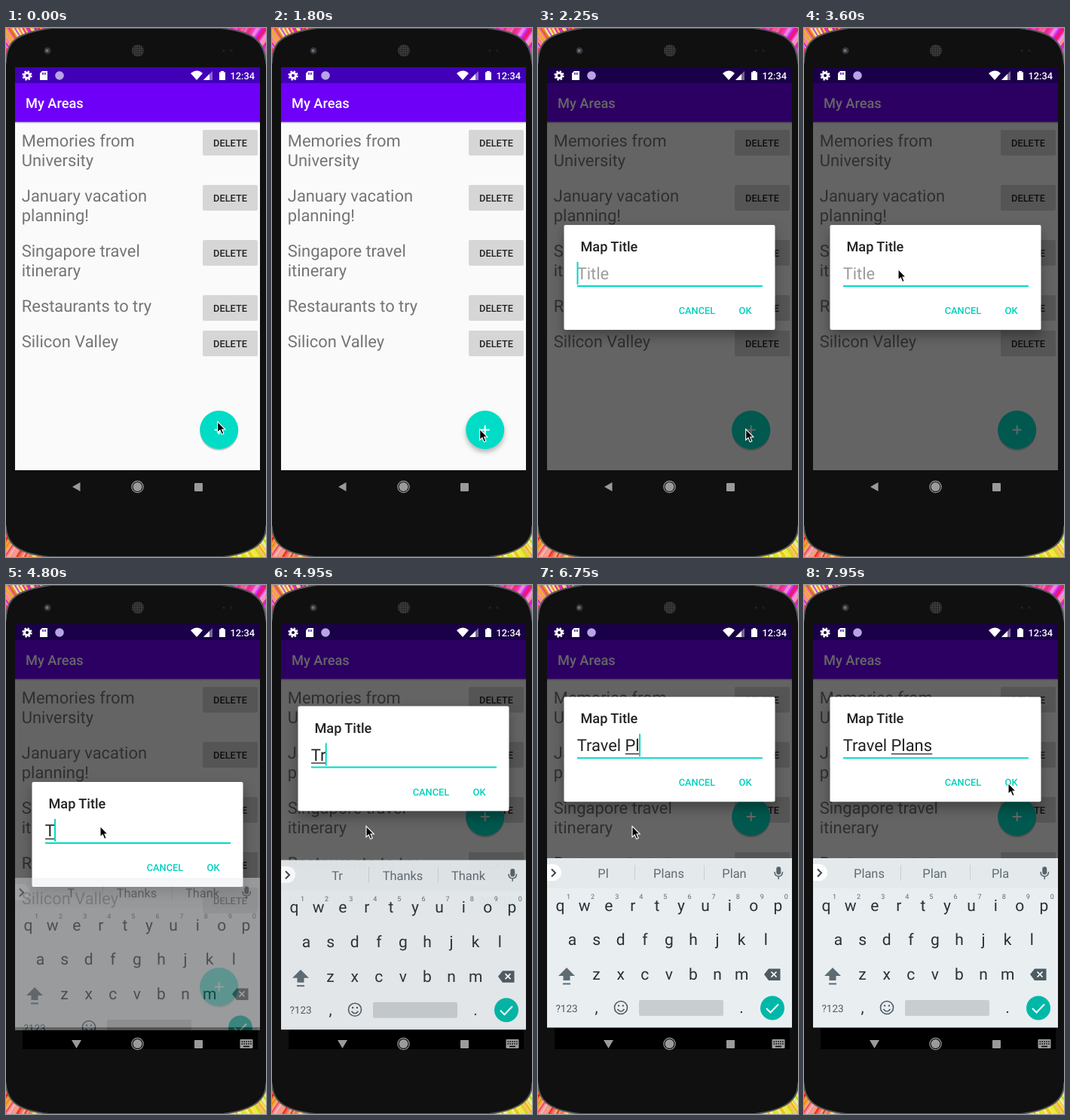
Recreate the animation shown at these times as an HTML page. Size 345 by 701 pixels, loop 8 s.

```html
<!DOCTYPE html>
<html lang="en">
<head>
<meta charset="utf-8">
<title>New map dialog</title>
<style>
  html, body { margin: 0; width: 100%; height: 100%; overflow: hidden; background: #111; }
  svg { display: block; width: 345px; height: 701px; }
  text { font-family: Roboto, "Noto Sans", sans-serif; white-space: pre; text-rendering: geometricPrecision; }
  .medium { font-weight: 500; }
  .mid { text-anchor: middle; }
  #dialog { filter: drop-shadow(0 8px 8px rgba(0, 0, 0, .32)); }
</style>
</head>
<body>
<svg viewBox="0 0 345 701">
  <defs>
    <linearGradient id="barShadow" x2="0" y2="1">
      <stop stop-color="#000" stop-opacity=".3"/>
      <stop offset="1" stop-color="#000" stop-opacity="0"/>
    </linearGradient>
    <clipPath id="screenClip"><rect x="12" y="52" width="325" height="534"/></clipPath>
    <clipPath id="keysClip"><rect x="12" y="52" width="325" height="538"/></clipPath>
    <pattern id="mesh" width="3" height="3" patternUnits="userSpaceOnUse">
      <rect width="3" height="3" fill="#3c3c3c"/><circle cx="1.5" cy="1.5" r=".9" fill="#191919"/>
    </pattern>
  </defs>

  <g id="wallpaper" stroke-width="2.5"/>
  <path d="M0 41C2 18 13 7 60 0H285C332 5 343 20 345 45V664C343 688 318 697 288 701H57C22 697 3 688 0 664Z"
    fill="#101010" stroke="#55585a" stroke-width="2"/>
  <path d="M0 49C4 22 20 12 64 5H281C325 11 341 24 345 50V658C340 684 316 692 284 696H61C26 692 5 684 0 658Z" fill="#101010"/>
  <circle cx="55" cy="30" r="4.5" fill="#33363b"/><circle cx="54.5" cy="30" r="2" fill="#70757e"/>
  <circle cx="175" cy="30" r="8" fill="url(#mesh)"/>
  <circle cx="289" cy="30" r="1.5" fill="#252525"/><circle cx="299" cy="30" r="2" fill="#1c1c1c"/>

  <g clip-path="url(#screenClip)">
    <rect x="12" y="52" width="325" height="535" fill="#fafafa"/>
    <g id="list"/>
    <rect x="12" y="124" width="325" height="3" fill="url(#barShadow)"/>
    <rect x="12" y="52" width="325" height="22" fill="#4100b8"/>
    <rect x="12" y="73" width="325" height="51.500" fill="#6e00f8"/>
    <text x="26" y="106" class="medium" font-size="18.2" fill="#fff">My Areas</text>
    <g id="fab">
      <circle id="fabDisc" r="25.5" fill="#00dcc5"/>
      <circle id="ripple" r="18" fill="#fff"/>
      <path d="M-6 0H6M0-6V6" stroke="#fff" stroke-width="2"/>
    </g>
    <rect id="dim" x="12" y="52" width="325" height="535"/>
  </g>

  <g fill="#fff">
    <circle cx="28" cy="63" r="3.5" fill="none" stroke="#fff" stroke-width="3"/>
    <circle cx="28" cy="63" r="5.6" fill="none" stroke="#fff" stroke-width="2" stroke-dasharray="2.4 2"/>
    <path d="M48 57H55V69H45V60Z"/>
    <path d="M48.500 59V62M50.500 59V62M52.500 59V62" stroke="#4100b8"/>
    <circle cx="71" cy="63" r="5.8" fill="#b7a4e6"/>
    <path d="M245 60Q253 53 261 60L253 69Z"/>
    <path d="M274 57V69H262Z" opacity=".4"/><path d="M270 61V69H262Z"/>
    <path d="M285 57H289V58.500H291V69H283V58.500H285Z"/>
    <text x="297.500" y="67.500" class="medium" font-size="12.8">12:34</text>
  </g>

  <g id="dialog">
    <rect x="34.500" width="280" height="139" rx="2" fill="#fff"/>
    <text x="56.500" y="35" class="medium" font-size="18.100" fill="#212121">Map Title</text>
    <text id="hint" x="51.700" y="72" font-size="21.900" fill="#9c9c9c">Title</text>
    <text id="typed" x="51.700" y="72" font-size="21.900" fill="#212121"></text>
    <path id="composing" stroke="#212121" stroke-width="1.300"/>
    <rect x="52" y="80" width="246" height="2" fill="#00d9c5"/>
    <rect id="caret" y="49" width="2" height="30" fill="#00d9c5"/>
    <g class="medium mid" font-size="12.800" fill="#00d0bc">
      <text x="211" y="118">CANCEL</text><text x="275" y="118">OK</text>
    </g>
  </g>

  <rect id="navBack" x="22" y="587" width="312" height="28" fill="#000"/>
  <g clip-path="url(#keysClip)">
    <g id="keyboard">
      <rect x="12" y="362" width="325" height="224.500" fill="#e9eef1"/>
      <rect x="12" y="362" width="325" height="40" fill="#e4e9ec"/>
      <path d="M12 370H20A11 11 0 0 1 20 392H12Z" fill="#fff"/>
      <path d="M18 376.500L23 381.500L18 386.500" fill="none" stroke="#37474f" stroke-width="2"/>
      <path d="M128.500 371V392M220.500 371V392" stroke="#c9cfd2"/>
      <g id="suggestions" class="mid" font-size="16.400" fill="#5e6b71"/>
      <g fill="none" stroke="#56646b" stroke-width="1.500">
        <rect x="317" y="374" width="4.500" height="9" rx="2.200" fill="#56646b"/>
        <path d="M314 380Q314 386 319.200 386T324.500 380M319.200 386V390"/>
      </g>
      <g id="keys" class="mid" fill="#263238"/>
      <path d="M38 507L49 518H42.500V524H33.500V518H27Z" fill="#5d6b73"/>
      <path d="M33 528.500H43" stroke="#5d6b73" stroke-width="2"/>
      <path d="M300 516L306 508.500H321.500V524H306Z" fill="#4d5b63"/>
      <path d="M309.500 512.500L316.500 519.500M316.500 512.500L309.500 519.500" stroke="#fff" stroke-width="1.700"/>
      <g fill="none" stroke="#4d5b63" stroke-width="1.600">
        <circle cx="110" cy="560" r="8.500"/><path d="M105.500 562Q110 568 114.500 562"/>
        <path d="M106 557.500H108.200M111.800 557.500H114" stroke-width="2.200"/>
      </g>
      <rect x="134" y="550" width="112" height="21" rx="2" fill="#c8cdd0"/>
      <circle cx="311" cy="560.500" r="16" fill="#00b8a8"/>
      <path d="M303 561L308.500 566.500L319 555.500" fill="none" stroke="#fff" stroke-width="2"/>
    </g>
  </g>

  <g fill="#9a9a9a">
    <path id="back"/>
    <circle cx="174.500" cy="608" r="6"/>
    <circle cx="174.500" cy="608" r="7.700" fill="none" stroke="#9a9a9a" stroke-width="1.200"/>
    <rect x="250" y="603" width="11" height="11" rx="1"/>
    <g id="imeIcon">
      <rect x="310.500" y="602" width="17" height="12" rx="1"/>
      <path d="M312.500 605H326M312.500 608H326" stroke="#000" stroke-width="1.500" stroke-dasharray="1.600 1.300"/>
      <path d="M315 611.500H323" stroke="#000" stroke-width="1.500"/>
    </g>
  </g>
  <path id="pointer" d="M0 0V14.500L3.300 11.500L5.600 17L8.200 16L5.900 10.500H10.200Z" fill="#000" stroke="#fff" stroke-width="1.100"/>
</svg>

<script>
const LOOP = 8000, STEP = 150;
const $ = id => document.getElementById(id);
const set = (id, attrs) => { for (const k in attrs) $(id).setAttribute(k, attrs[k]); };
const show = (id, on) => set(id, { visibility: on ? 'visible' : 'hidden' });

function add(parent, tag, attrs, text = '') {
  const el = document.createElementNS('http://www.w3.org/2000/svg', tag);
  for (const k in attrs) el.setAttribute(k, attrs[k]);
  el.textContent = text;
  return $(parent).appendChild(el);
}

let seed = 7;
const random = () => (seed = seed * 16807 % 2147483647) / 2147483647;

// Each corner shows paint streaks around its own hue: x, y, hue, spread
const corners = [[0, 0, 350, 170], [285, 0, 318, 60], [0, 655, 18, 60], [285, 655, 52, 45]];
for (const [x, y, hue, spread] of corners) {
  add('wallpaper', 'rect', { x, y, width: 60, height: 46, fill: `hsl(${hue} 85% 60%)` });
  for (let i = 0; i < 26; i++) {
    const sx = x + i * 2.4, lean = (sx - 172) * .1 * (y ? 1 : -1);
    add('wallpaper', 'path', {
      d: `M${sx - lean} ${y}L${sx + lean} ${y + 46}`,
      stroke: `hsl(${hue + (random() - .5) * spread} 85% ${45 + random() * 35}%)`
    });
  }
}

const rows = [
  [135, 'Memories from', 'University'],
  [208, 'January vacation', 'planning!'],
  [281, 'Singapore travel', 'itinerary'],
  [354, 'Restaurants to try'],
  [401, 'Silicon Valley']
];
for (const [y, ...lines] of rows) {
  lines.forEach((line, i) => add('list', 'text',
    { x: 20.8, y: y + 22 + i * 25.7, 'font-size': 21.9, fill: '#757575' }, line));
  add('list', 'rect', { x: 261, y, width: 73, height: 34, rx: 2, fill: '#d6d6d6' });
  add('list', 'text', { x: 297.5, y: y + 21.5, class: 'medium mid', 'font-size': 12.8, fill: '#212121' }, 'DELETE');
}

const key = (x, y, label, size = 21) => add('keys', 'text', { x, y, 'font-size': size }, label);
[['qwertyuiop', 29.5, 431.5], ['asdfghjkl', 45.5, 477], ['zxcvbnm', 77.5, 523]].forEach(([letters, x, y], row) =>
  [...letters].forEach((letter, i) => {
    key(x + i * 32.1, y, letter);
    if (!row) key(x + 11 + i * 32.1, 416, (i + 1) % 10, 9).setAttribute('fill', '#5e6b71');
  }));
key(38, 565.5, '?123', 13.5).setAttribute('fill', '#4d5b63');
key(77.5, 567, ',');
key(270, 567, '.');
const suggestionTexts = [86.5, 173.5, 260.5].map(x => add('suggestions', 'text', { x, y: 388 }));

// Start time, typed text, suggestions
const typing = [
  [0, '', ''],
  [4800, 'T', 'T Thanks Thank'],
  [4950, 'Tr', 'Tr Thanks Thank'],
  [5100, 'Tra', 'Tra Travel Train'],
  [5550, 'Trav', 'Trav Travel Travels'],
  [5700, 'Trave', 'Trave Travel Travels'],
  [5850, 'Travel', 'Travel Travels Traveled'],
  [6000, 'Travel ', 'to and time'],
  [6150, 'Travel P', 'P Plans Plan'],
  [6750, 'Travel Pl', 'Pl Plans Plan'],
  [6900, 'Travel Pla', 'Pla Plans Plan'],
  [7050, 'Travel Plan', 'Plan Plans Pla'],
  [7200, 'Travel Plans', 'Plans Plan Pla']
];

// Spans in which the blinking caret is hidden
const caretGaps = [[2550, 3000], [3600, 4050], [4500, 4800], [7650, LOOP]];

// Time, x, y of the pointer tip
const pointerPath = [
  [0, 280.7, 521.5], [1050, 280.7, 521.5], [1350, 275.7, 531.5], [2250, 275.7, 531.5], [3000, 125, 319.5],
  [7200, 125, 319.5], [7650, 262, 270], [7950, 271, 262.5]
];
const smooth = p => p * p * (3 - 2 * p);

function pointerAt(t) {
  const i = pointerPath.findIndex(p => p[0] > t);
  if (i < 0) return pointerPath.at(-1).slice(1);
  const [a, b] = [pointerPath[i - 1], pointerPath[i]];
  const p = smooth((t - a[0]) / (b[0] - a[0]));
  return [a[1] + (b[1] - a[1]) * p, a[2] + (b[2] - a[2]) * p];
}

function draw(now) {
  const t = Math.floor(now % LOOP / STEP) * STEP;
  const open = t >= 2100, fading = t === 2100, keysUp = t >= 4800, settled = t >= 5100;

  const [px, py] = pointerAt(t);
  set('pointer', { transform: `translate(${px} ${py})` });

  const lift = t === 1650 ? .5 : t >= 1800 && t < 2250 ? 1 : 0;
  set('fab', { transform: `translate(282.7 ${t >= 4950 ? 307 : 532.5})` });
  $('fabDisc').style.filter = lift
    ? `drop-shadow(0 ${2 + lift * 2}px ${lift * 3}px rgba(0,0,0,.28))`
    : 'drop-shadow(0 2.5px .7px rgba(0,0,0,.2))';
  set('ripple', { opacity: t === 1650 ? .2 : 0 });

  set('dim', { opacity: open ? fading ? .29 : .6 : 0 });
  show('dialog', open);
  const top = t < 4950 ? 261 : settled ? 148.3 : 160.5;
  set('dialog', { transform: `translate(0 ${top})`, opacity: fading ? .82 : 1 });

  const [, text, words] = typing.findLast(step => step[0] <= t);
  $('typed').textContent = text;
  show('hint', open && !text);
  const width = text ? $('typed').getComputedTextLength() : 0;
  const wordStart = text.lastIndexOf(' ') + 1;
  const startX = 52 + (wordStart ? $('typed').getSubStringLength(0, wordStart) : 0);
  set('composing', { d: text.length > wordStart ? `M${startX} 75.500H${52 + width}` : '' });
  set('caret', { x: text ? 51 + width : 51.5 });
  show('caret', open && !caretGaps.some(([from, to]) => t >= from && t < to));

  show('keyboard', keysUp);
  show('navBack', keysUp);
  show('imeIcon', keysUp);
  set('keyboard', {
    transform: `translate(0 ${settled ? 0 : t >= 4950 ? 2.7 : 26})`,
    opacity: settled ? 1 : t >= 4950 ? .95 : .4
  });
  suggestionTexts.forEach((el, i) => el.textContent = words.split(' ')[i] || '');
  set('back', { d: keysUp ? 'M87 603H100L93.500 614Z' : 'M88 608L98.500 602V614Z' });
}

const start = performance.now();
function tick() {
  draw(performance.now() - start);
  requestAnimationFrame(tick);
}
tick();
</script>
</body>
</html>
```
